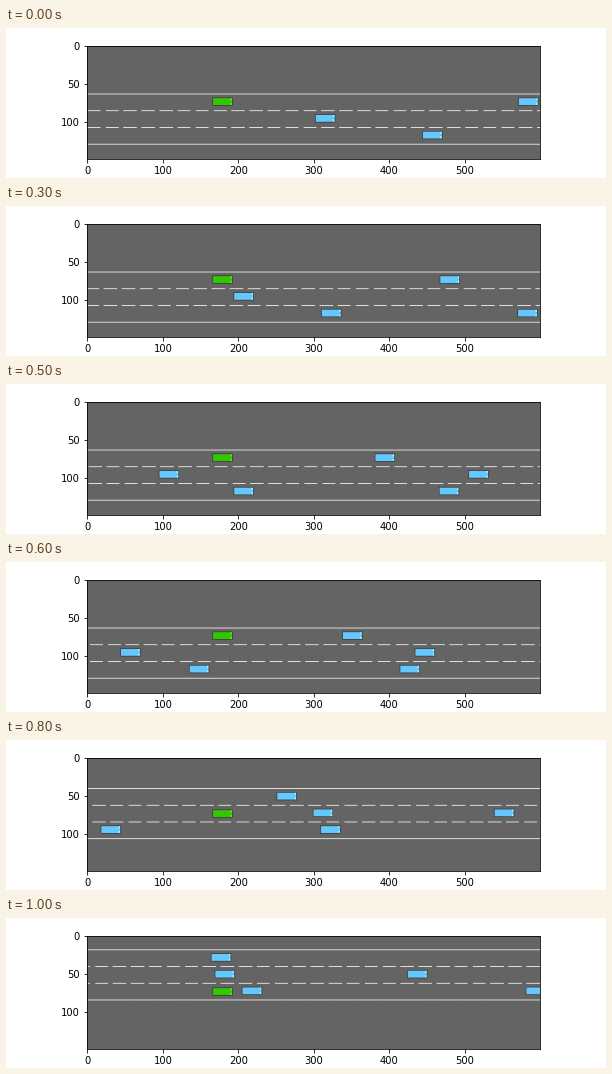
Animation of 600 by 150 pixels, one loop 1.1 s. Source, as a matplotlib script:

```python
import numpy as np
import matplotlib.pyplot as plt
from matplotlib.animation import FuncAnimation

W, H, DPI = 600, 150, 72
FRAMES, STEP_MS = 11, 100

SCALE = 5.5                       # road units per metre
LANE = 22
DASH_GAP, DASH_LEN = 4.33 * SCALE, 3 * SCALE
CAR_W, CAR_H = 27, 11
ROAD_TOP, CAR_TOP, EGO_X = 64, 69, 166

GREY, WHITE, OUTLINE = (100, 100, 100), (255, 255, 255), (60, 60, 60)
GREEN, BLUE = (50, 200, 0), (100, 200, 255)


def settle(t, tau):
    return 1 - np.exp(-t / tau)


def travelled(t):
    """Metres driven by the green car while speeding up from 25 to 30 m/s."""
    return 30 * t - 3 * settle(t, 0.6)


class Car:
    """Traffic car that settles to a cruising speed (metres, m/s)."""

    def __init__(self, lane, start, cruise, extra=0, tau=1):
        self.lane, self.start, self.cruise = lane, start, cruise
        self.extra, self.tau = extra, tau

    def x(self, t):
        pos = self.start + self.cruise * t + self.extra * settle(t, self.tau)
        return int(round((pos - travelled(t)) * SCALE))


TRAFFIC = [
    Car(0, 103.8, 22.1, extra=2.1, tau=1.5),
    Car(1, 54.9, 20.2, extra=9.7, tau=2.5),
    Car(2, 80.7, 19.35, extra=4.8, tau=0.9),
    Car(2, 129.2, 20.5),
    Car(1, 173.8, 18.6, extra=-32.8, tau=2.6),
    Car(1, 178.6, 19.55),
    Car(2, 206.6, 19.6),
]


def lane_change(t):
    """Damped steering from 0 to 1 lane with a small overshoot."""
    return 1 - np.exp(-1.5 * t) * np.cos(1.46 * t) if t > 0 else 0


def road_shift(t):
    return -int(round(LANE * (lane_change(t - 6) + lane_change(t - 8))))


def fill(img, x, y, w, h, color):
    img[max(y, 0):max(y + h, 0), max(x, 0):max(x + w, 0)] = color


def draw_car(img, x, y, color):
    light = [min(int(c / 0.68), 255) for c in color]
    fill(img, x, y, CAR_W, CAR_H, OUTLINE)
    fill(img, x + 1, y + 1, CAR_W - 2, CAR_H - 2, color)
    for dy in (1, 7):
        fill(img, x + CAR_W - 3, y + dy, 2, 3, light)


def draw_road(img, t, top):
    for y in (top, top + 3 * LANE):
        fill(img, 0, y, W, 1, WHITE)
    first = (1.3 - travelled(t) * SCALE) % DASH_GAP - DASH_GAP
    for x in np.arange(first, W, DASH_GAP):
        a, b = int(np.floor(x)), int(np.floor(x + DASH_LEN))
        for y in (top + LANE, top + 2 * LANE):
            fill(img, a, y, b - a + 1, 1, WHITE)


def render(t):
    img = np.full((H, W, 3), GREY, dtype=np.uint8)
    shift = road_shift(t)
    draw_road(img, t, ROAD_TOP + shift)
    for car in TRAFFIC:
        draw_car(img, car.x(t), CAR_TOP + car.lane * LANE + shift, BLUE)
    draw_car(img, EGO_X, CAR_TOP, GREEN)
    return img


plt.rcParams.update({"font.family": "DejaVu Sans", "font.size": 10})
fig = plt.figure(figsize=(W / DPI, H / DPI), dpi=DPI, facecolor="white")
fig.subplots_adjust(left=0.125, right=0.9, bottom=0.125, top=0.88)
ax = fig.add_subplot()
view = ax.imshow(render(0))
ax.set_xticks(range(0, W, 100))
ax.set_yticks(range(0, H, 50))


def update(t):
    view.set_data(render(t))
    return [view]


anim = FuncAnimation(fig, update, frames=FRAMES, interval=STEP_MS,
                     repeat=True, repeat_delay=0)
plt.show()
```
